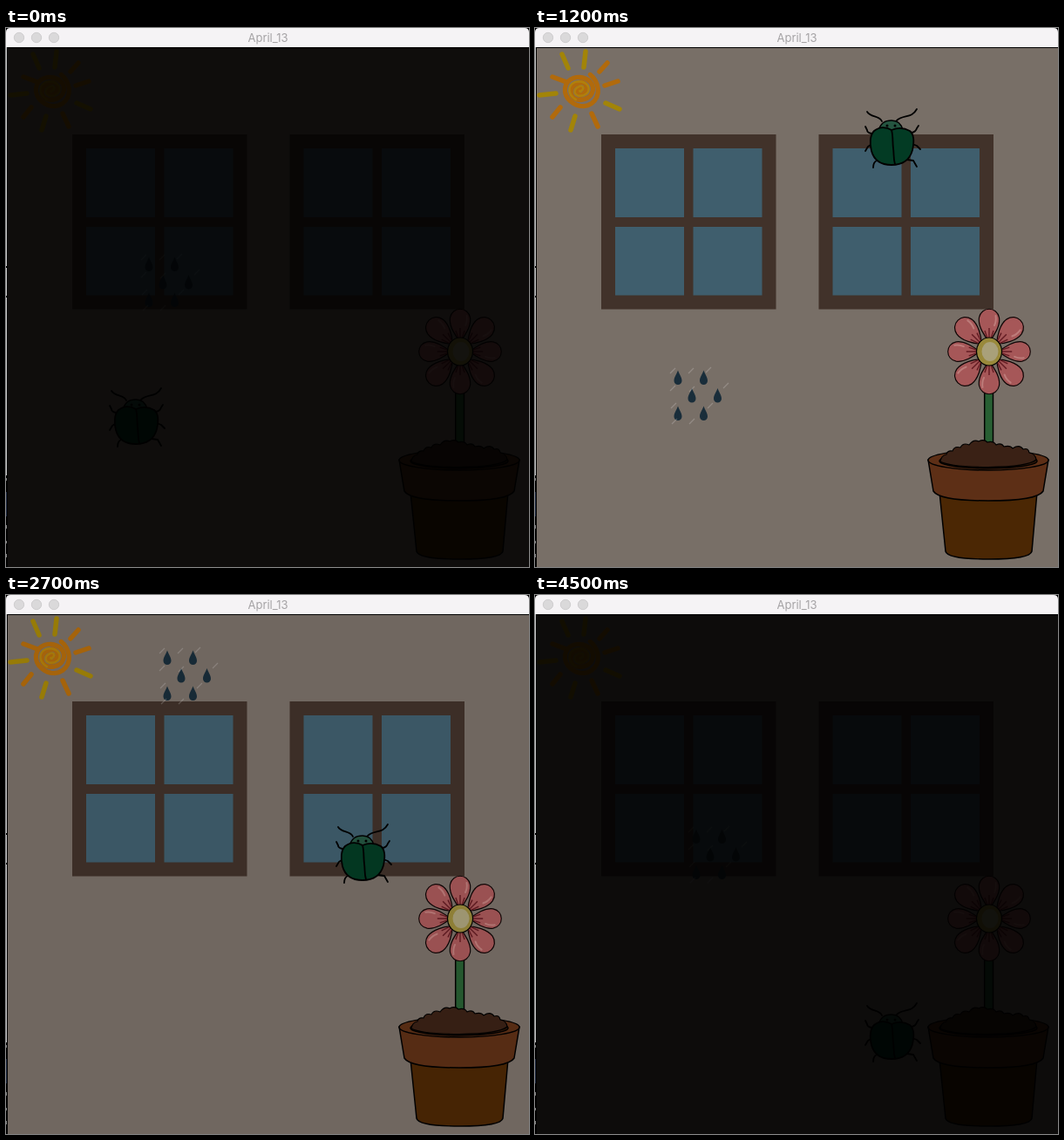
An HTML page for the animation above (4.6 s loop, 600x618 px).

```html
<!DOCTYPE html>
<html lang="en">
<head>
<meta charset="utf-8">
<title>April_13</title>
<style>
html, body { margin: 0; width: 100%; height: 100%; overflow: hidden; background: #000; }
svg { display: block; width: 600px; height: 618px; }
.line { fill: none; stroke: #000; stroke-linecap: round; stroke-linejoin: round; }
</style>
</head>
<body>
<svg viewBox="0 0 600 618" xmlns="http://www.w3.org/2000/svg">
  <defs>
    <g id="window">
      <path fill="#41322a" d="M0 0h200.500v200.500h-200.500z"/>
      <path fill="#3f5e6d" d="M16 16h79v79h-79zM105.500 16h79v79h-79zM16 106h79v78.500h-79zM105.500 106h79v78.500h-79z"/>
    </g>
    <g id="petal">
      <path fill="#a65758" stroke="#100606" stroke-width="1.200" d="M0-12C-6-18-13-30-11.500-39C-9-52 9-52 11.500-39C13-30 6-18 0-12Z"/>
      <path fill="none" stroke="#bd7c7a" stroke-width="2" stroke-linecap="round" d="M7.500-41Q8.500-35 6-30"/>
      <path fill="none" stroke="#641c23" stroke-width="1.400" d="M0-14V-27M-2-15L-5-24M2-15L5-24"/>
    </g>
    <path id="drop" fill="#192d3a" d="M0-8.500C1-5 4.500-1 4.500 3.500A4.500 4.500 0 0 1-4.500 3.500C-4.500-1-1-5 0-8.500Z"/>
    <path id="streak" fill="none" stroke="#fff" stroke-opacity=".2" stroke-width="1.200" d="M-3 3L3-3"/>
    <clipPath id="stage"><rect x="2" y="23" width="598" height="595"/></clipPath>
  </defs>

  <rect width="600" height="618" fill="#000"/>
  <g clip-path="url(#stage)">
    <rect x="2" y="23" width="598" height="595" fill="#786f67"/>
    <g id="sun" fill="none" stroke-linecap="round"></g>
    <use href="#window" x="76" y="122"/>
    <use href="#window" x="325.500" y="122"/>

    <g stroke="#000" stroke-width="1.500" stroke-linejoin="round">
      <rect x="515.700" y="414" width="9.800" height="68" fill="#285f33"/>
      <path fill="#4b2704" d="M464 532L471 600Q473 609 520.500 609T570 600L576 532Z"/>
      <path fill="#5d2f16" d="M451 495L457 531Q464 542 520 542T583 531L589 495Z"/>
      <ellipse cx="520" cy="495.500" rx="69" ry="11.500" fill="#5d2f16"/>
      <ellipse cx="520" cy="496.500" rx="56" ry="8.500" fill="#2f1709"/>
      <path fill="#3a2115" stroke-width="1.200" d="M465 497Q466 490 472 489Q473 484 479 485Q481 479 488 481Q491 475 498 478Q503 471 509 474Q515 471 519 475Q526 473 529 478Q535 475 538 480Q545 478 548 482Q556 477 560 483Q566 481 567 487Q574 488 575 495Q566 503 520 503.500Q475 503 465 497Z"/>
    </g>
    <g id="flower" transform="translate(521 371)"></g>

    <g id="rain"></g>
    <g id="bug">
      <g class="line" stroke-width="1.800">
        <path d="M-11-20C-14-27-24-24-28-31M6-21C14-28 23-23 29-34"/>
        <path d="M-23-6Q-28-7-28-10L-30-14M23-7Q28-8 29-12L31-15"/>
        <path d="M-24 7L-27 9L-30 14M24 6L29 8L33 12M-17 25Q-21 27-21 33M18 24L25 25L29 32"/>
      </g>
      <path fill="#255540" stroke="#000" stroke-width="1.500" d="M-15-10C-12-18-8-21 0-21C7-21 11-18 13-10Q0-5-15-10Z"/>
      <path fill="#033b24" stroke="#000" stroke-width="1.800" d="M0-10C-6-14-14-14-20-9C-25-4-25 6-23 14C-20 25-12 30 0 30C13 30 21 24 24 13C26 4 26-5 21-9C14-13 7-13 0-10Z"/>
      <path class="line" stroke-width="1.800" d="M0-10C2-3 1 4 2 11S2 23 4 29"/>
      <circle cx="-5" cy="-15" r="1.500"/><circle cx="4" cy="-15" r="1.500"/>
    </g>
    <rect id="shade" y="22" width="600" height="596"/>
  </g>

  <path fill="#c9c9ca" d="M0 22h1v251h-1zM0 275h1v32h-1zM0 309h1v204h-1z"/>
  <path fill="#26324a" d="M0 532h1v28h-1z"/>
  <path fill="#8a8a8a" d="M0 516h1v3h-1zM0 570h1v4h-1zM0 588h1v3h-1zM0 603h1v4h-1z"/>
  <path fill="#f5f3f5" d="M0 22V5Q0 0 5 0H595Q600 0 600 5V22Z"/>
  <g fill="#dad9da" stroke="#c8c7c8" stroke-width=".8">
    <circle cx="15" cy="11" r="5.700"/><circle cx="35" cy="11" r="5.700"/><circle cx="55" cy="11" r="5.700"/>
  </g>
  <text x="300.500" y="16" text-anchor="middle" font-family="Inter, Roboto, sans-serif" font-size="13" fill="#a5a3a5">April_13</text>
</svg>
<script>
const LOOP = 4600, TICK = 100, STEP = 5, STEPS_PER_TICK = 2.245;
const $ = id => document.getElementById(id);

function add(parent, tag, attrs) {
  const node = document.createElementNS('http://www.w3.org/2000/svg', tag);
  for (const key in attrs) node.setAttribute(key, attrs[key]);
  return parent.appendChild(node);
}

function buildSun() {
  const sun = $('sun'), yellow = '#a28408', orange = '#b16a0c';
  const rays = [
    ['M58 27L56 45', yellow], ['M31 30L38 46', yellow], ['M20 56L36 62', orange],
    ['M5 77L24 75', yellow], ['M20 102L29 91', orange], ['M41 117L46 101', yellow],
    ['M65 98L72 113', orange], ['M81 86L97 93', yellow], ['M80 66L95 61', orange],
    ['M74 50L83 40', orange]
  ];
  for (const [d, stroke] of rays) add(sun, 'path', { d, stroke, 'stroke-width': 5.5 });

  const spiral = (radius, turns, phase) => {
    let d = '';
    for (let i = 0; i <= 80; i++) {
      const a = phase + i / 80 * turns * Math.PI * 2;
      const r = radius * (1 - i / 85) + Math.sin(a * 2.3) * 0.8;
      d += `${i ? 'L' : 'M'}${(52 + r * Math.cos(a)).toFixed(1)} ${(71 + r * Math.sin(a)).toFixed(1)}`;
    }
    return d;
  };
  add(sun, 'path', { d: spiral(21.5, 3, -1), stroke: orange, 'stroke-width': 5.2 });
  add(sun, 'path', { d: spiral(13, 2, 2), stroke: '#b0800c', 'stroke-width': 2.5 });
}

function buildFlower() {
  const flower = $('flower');
  for (const angle of [45, 135, 225, 315, 0, 90, 180, 270]) {
    const scale = angle % 90 ? 1.04 : angle % 180 ? 0.97 : 1;
    add(flower, 'use', { href: '#petal', transform: `rotate(${angle}) scale(${scale})` });
  }
  add(flower, 'ellipse', { rx: 14.5, ry: 16, fill: '#99893b', stroke: '#000', 'stroke-width': 1.2 });
  add(flower, 'ellipse', { cx: 1, cy: 0, rx: 9.5, ry: 11, fill: '#a9a07a' });
}

function buildRain() {
  const rain = $('rain');
  for (let row = 0; row < 3; row++) {
    for (let col = 0; col < 2; col++) {
      add(rain, 'use', { href: '#drop', x: col * 29.5 + (row % 2) * 16, y: row * 20.5 });
    }
  }
  const streaks = [[-6, -8], [15, -8], [35, -9], [55, 9], [-6, 12], [16, 13], [-5, 32], [37, 32], [16, 50], [-4, 50]];
  for (const [x, y] of streaks) add(rain, 'use', { href: '#streak', x, y });
}

// Wall brightness over time, relative to the painted colours.
const light = [[0, .12], [700, .6], [1200, 1], [1800, .89], [2700, .93], [3000, .78],
               [3400, .35], [3700, .17], [4200, .11], [LOOP, .11]];

function brightness(t) {
  const i = light.findIndex(key => key[0] > t);
  const [t0, v0] = light[i - 1], [t1, v1] = light[i];
  return v0 + (v1 - v0) * (t - t0) / (t1 - t0);
}

// Falls from the start height and reappears once, higher up at another x.
function fall(id, moved, start, limit, height, xBefore, xAfter) {
  const y = start + moved;
  const wrapped = y > limit;
  $(id).setAttribute('transform', `translate(${wrapped ? xAfter : xBefore} ${wrapped ? y - height : y})`);
}

function render(now) {
  const tick = Math.floor(now % LOOP / TICK);
  const moved = STEP * Math.floor(tick * STEPS_PER_TICK);
  fall('bug', moved, 447, 504, 450, 149, 409);
  fall('rain', moved, 271, 532, 499, 164, 185);
  $('shade').setAttribute('opacity', 1 - brightness(tick * TICK));
}

buildSun();
buildFlower();
buildRain();
const begin = performance.now();
function frame() {
  render(performance.now() - begin);
  requestAnimationFrame(frame);
}
frame();
</script>
</body>
</html>
```
